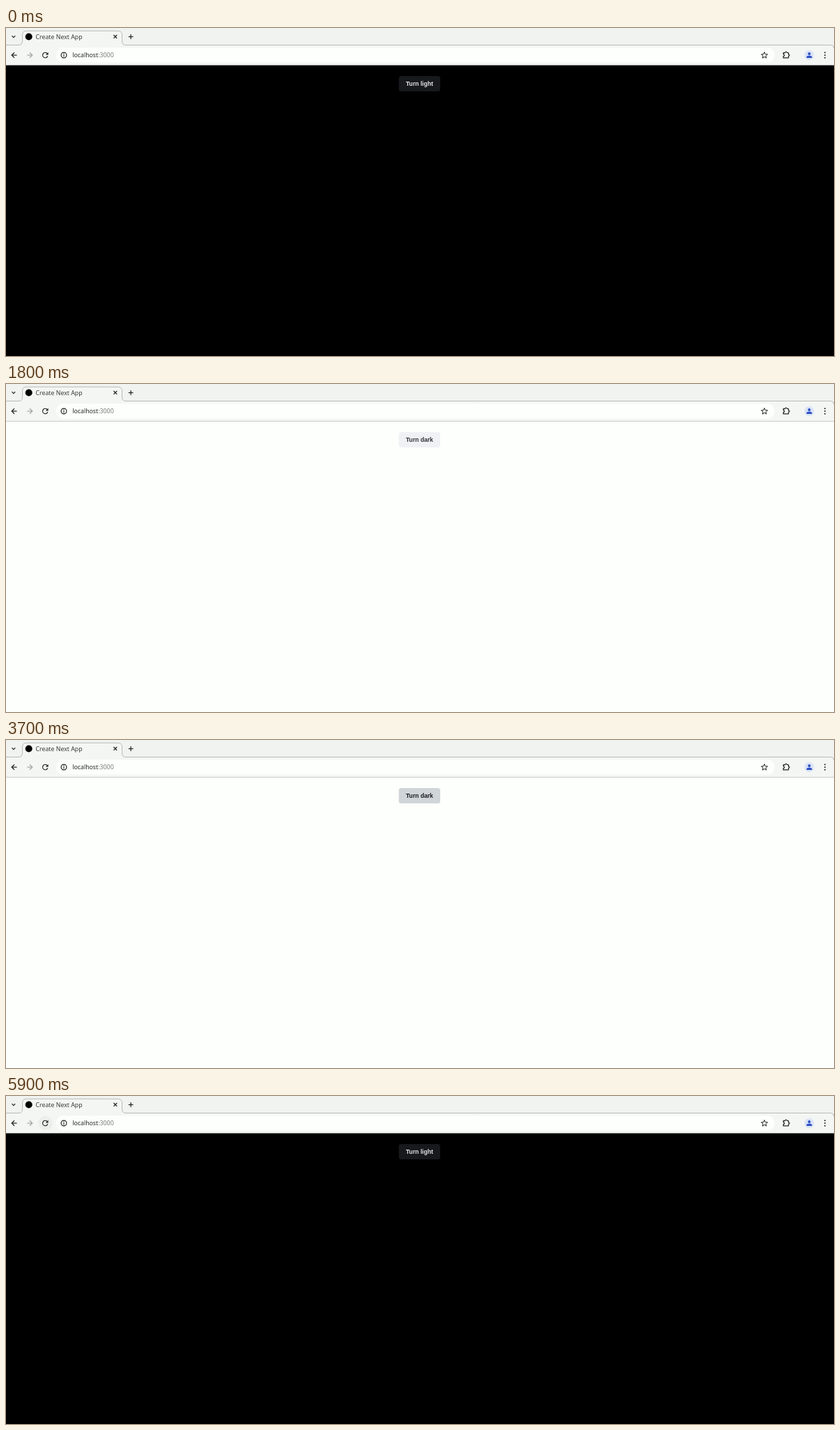
Animation of 1188x471 px, one loop 6500 ms. Source, as an HTML page with a canvas:

```html
<!DOCTYPE html>
<html lang="en">
<head>
<meta charset="utf-8">
<title>Theme toggle</title>
<style>
  html, body { margin: 0; width: 100%; height: 100%; overflow: hidden; background: #fdfffc; }
  canvas { display: block; width: 1188px; height: 471px; }
</style>
</head>
<body>
<canvas id="stage" width="1188" height="471"></canvas>
<script>
const ctx = document.getElementById('stage').getContext('2d');
const W = 1188, H = 471, LOOP = 6500;
const INK = '#202220', WHITE = '#fdfffc', BAR = '#f4f6f3', STRIP = '#f0f3f0';
const UI = '8.78px "Noto Sans", sans-serif';
const BOLD = 'bold 8.65px "Liberation Sans", Arial, sans-serif';

const themes = {
  dark: {
    page: '#000', label: 'Turn light',
    idle: ['#17191c', '#e4e7ea'], hover: ['#303437', '#e6eaee'], press: ['#555b62', '#f3f5f7']
  },
  light: {
    page: WHITE, label: 'Turn dark',
    idle: ['#f0f1f4', '#2d3138'], hover: ['#dfe4e8', '#32383e'], press: ['#d0d5da', '#171a1c']
  }
};

// [start, theme, button state]
const buttonSteps = [
  [0, 'dark', 'idle'], [500, 'dark', 'hover'], [800, 'dark', 'press'],
  [1000, 'light', 'hover'], [1600, 'light', 'idle'],
  [3500, 'light', 'hover'], [3700, 'light', 'press'],
  [3800, 'dark', 'hover'], [4000, 'dark', 'idle']
];

// [start, end] of each page load: spinner in the tab, stop icon in the toolbar
const spins = [[2300, 2600], [5000, 5400]];
const stops = [[2300, 2700], [5000, 5500]];

// [start, end, colour] behind the reload icon
const halos = [[2100, 2200, '#e4e6e3'], [2200, 2400, '#d3d5d2'], [2400, 3300, '#dddfdc'], [5900, 6500, '#eceeeb']];

const during = (list, t) => list.find(([a, b]) => t >= a && t < b);

function line(color, width, ...pts) {
  ctx.beginPath();
  pts.forEach(([x, y], i) => i ? ctx.lineTo(x, y) : ctx.moveTo(x, y));
  ctx.strokeStyle = color;
  ctx.lineWidth = width;
  ctx.stroke();
}

function disc(x, y, r, color) {
  ctx.beginPath();
  ctx.arc(x, y, r, 0, Math.PI * 2);
  ctx.fillStyle = color;
  ctx.fill();
}

function ring(x, y, r, color, width, from = 0, to = Math.PI * 2) {
  ctx.beginPath();
  ctx.arc(x, y, r, from, to);
  ctx.strokeStyle = color;
  ctx.lineWidth = width;
  ctx.stroke();
}

function rect(x, y, w, h, color, r = 0) {
  ctx.beginPath();
  ctx.roundRect(x, y, w, h, r);
  ctx.fillStyle = color;
  ctx.fill();
}

function text(str, x, y, font, color, align = 'left') {
  ctx.font = font;
  ctx.fillStyle = color;
  ctx.textAlign = align;
  ctx.fillText(str, x, y);
}

function cross(x, y, r, width) {
  line(INK, width, [x - r, y - r], [x + r, y + r]);
  line(INK, width, [x + r, y - r], [x - r, y + r]);
}

function arrow(x, y, dir, color) {
  line(color, 1.2, [x - 4 * dir, y], [x + 3.6 * dir, y]);
  line(color, 1.2, [x, y - 3.7], [x - 3.8 * dir, y], [x, y + 3.7]);
}

function drawTab(t) {
  rect(0, 0, W, 54, STRIP);
  rect(0, 24.5, W, 29, BAR, [6, 6, 0, 0]);
  ctx.beginPath();
  ctx.moveTo(0, 24.5);
  ctx.lineTo(18, 24.5);
  ctx.quadraticCurveTo(23.5, 24.5, 23.5, 19);
  ctx.lineTo(23.5, 10);
  ctx.quadraticCurveTo(23.5, 4.2, 29.5, 4.2);
  ctx.lineTo(160.5, 4.2);
  ctx.quadraticCurveTo(166.5, 4.2, 166.5, 10);
  ctx.lineTo(166.5, 19);
  ctx.quadraticCurveTo(166.5, 24.5, 172, 24.5);
  ctx.lineTo(1183, 24.5);
  ctx.quadraticCurveTo(1187.5, 24.5, 1187.5, 29);
  ctx.fillStyle = BAR;
  ctx.save();
  ctx.clip();
  ctx.fillRect(18, 4, 155, 21);
  ctx.restore();
  ctx.strokeStyle = '#b9bbb8';
  ctx.lineWidth = 1;
  ctx.stroke();

  line(INK, 1.2, [8.5, 11.2], [10.9, 13.6], [13.3, 11.2]);
  const spin = during(spins, t);
  if (spin) {
    const a = (t - spin[0]) / 100 * 1.3 - 1.6;
    disc(32.7, 12.5, 3.2, '#000');
    ring(32.7, 12.5, 4.9, '#2f62d0', 1.1, a, a + 3.4);
  } else {
    disc(32.7, 12.5, 5, '#000');
  }
  text('Create Next App', 42.5, 15.8, UI, '#3b3d3b');
  cross(156.8, 12.4, 2.4, 1.2);
  line(INK, 1.2, [175.7, 12.5], [182.5, 12.5]);
  line(INK, 1.2, [179.1, 9.1], [179.1, 15.9]);
}

function drawReload(t) {
  const halo = during(halos, t);
  if (halo) disc(56.5, 38.8, 10.3, halo[2]);
  if (during(stops, t)) return cross(56.5, 38.9, 3.4, 1.2);
  ring(56.3, 39, 3.7, INK, 1.2, 0.35, 5.6);
  ctx.beginPath();
  ctx.moveTo(60.6, 34.8);
  ctx.lineTo(60.6, 38.5);
  ctx.lineTo(56.9, 38.5);
  ctx.fillStyle = INK;
  ctx.fill();
}

function drawStar(x, y) {
  ctx.beginPath();
  for (let i = 0; i < 10; i++) {
    const r = i % 2 ? 2.1 : 4.8, a = i * Math.PI / 5 - Math.PI / 2;
    ctx.lineTo(x + r * Math.cos(a), y + r * Math.sin(a));
  }
  ctx.closePath();
  ctx.strokeStyle = INK;
  ctx.lineWidth = 1;
  ctx.stroke();
}

function drawPuzzle(x, y) {
  ctx.beginPath();
  ctx.moveTo(x - 4, y - 3);
  ctx.lineTo(x - 1.5, y - 3);
  ctx.arc(x - 0.2, y - 3.3, 1.3, Math.PI, 0);
  ctx.lineTo(x + 3.3, y - 3);
  ctx.lineTo(x + 3.3, y - 0.8);
  ctx.arc(x + 3.5, y + 0.5, 1.3, -Math.PI / 2, Math.PI / 2);
  ctx.lineTo(x + 3.3, y + 4.3);
  ctx.lineTo(x - 4, y + 4.3);
  ctx.lineTo(x - 4, y + 2);
  ctx.arc(x - 3.8, y + 0.6, 1.4, Math.PI / 2, -Math.PI / 2, true);
  ctx.closePath();
  ctx.strokeStyle = INK;
  ctx.lineWidth = 1.2;
  ctx.stroke();
}

function drawProfile(x, y) {
  disc(x, y, 7, '#dbe4f6');
  disc(x, y - 2.1, 2, '#2d4fc4');
  rect(x - 4, y + 0.8, 8, 3.3, '#2d4fc4', [3, 3, 0.5, 0.5]);
}

function drawToolbar(t) {
  arrow(12, 39, 1, INK);
  arrow(34, 39, -1, '#a3a5a2');
  drawReload(t);
  rect(72, 28.2, 1031, 21.4, WHITE, 10.7);
  ring(83, 39, 3.9, INK, 1.2);
  line(INK, 1.2, [83, 38.4], [83, 41.2]);
  line(INK, 1.2, [83, 36.6], [83, 37.7]);
  text('localhost', 95.2, 42.2, UI, '#252725');
  const w = ctx.measureText('localhost').width;
  text(':3000', 95.2 + w, 42.2, UI, '#777977');
  drawStar(1088.2, 39.3);
  drawPuzzle(1119.3, 38.6);
  drawProfile(1152.5, 39);
  for (const y of [35.2, 39, 42.8]) disc(1175, y, 1, INK);
}

function drawPage(t) {
  const [, name, state] = buttonSteps.findLast(s => t >= s[0]);
  const theme = themes[name], [fill, ink] = theme[state];
  rect(0, 53.5, W, H - 53.5, theme.page);
  if (name === 'light') rect(0, 53, W, 1, '#c9cbc8');
  rect(563.6, 69, 59.4, 22, fill, 3.6);
  text(theme.label, 593.3, 83, BOLD, ink, 'center');
}

function frame(now) {
  const t = Math.floor(now % LOOP / 100) * 100;
  drawTab(t);
  drawToolbar(t);
  drawPage(t);
  requestAnimationFrame(frame);
}

ctx.textBaseline = 'alphabetic';
requestAnimationFrame(frame);
</script>
</body>
</html>
```
